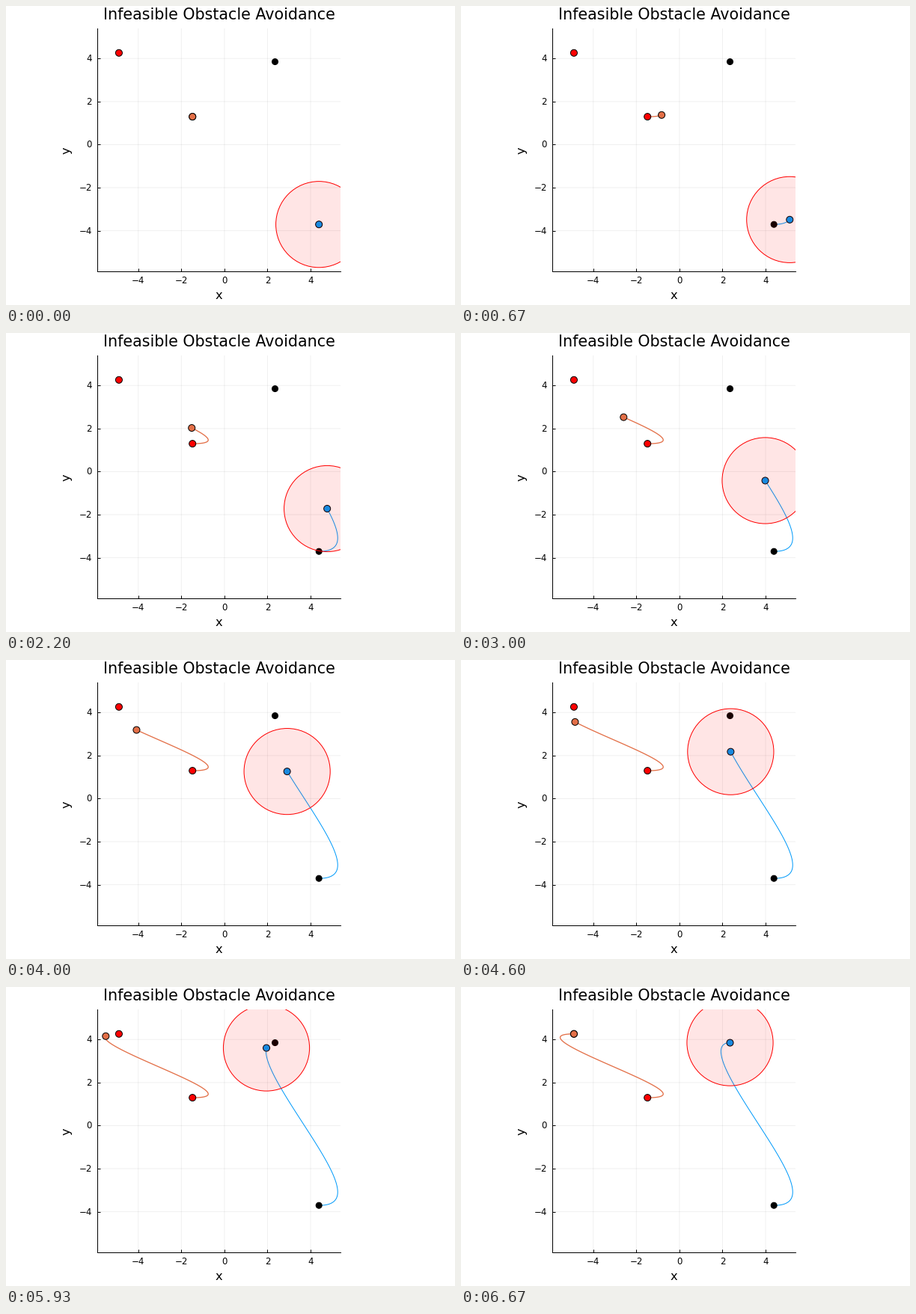
Recreate the animation shown at these times as a matplotlib script. Size 600 by 400 pixels, loop 6.74 s.

```python
import numpy as np
import matplotlib
import matplotlib.pyplot as plt
from matplotlib.animation import FuncAnimation
from matplotlib.patches import Circle

W, H, DPI = 600, 400, 100
PX = 72 / DPI                      # one pixel in points
LOOP, TICK = 6740, 20              # ms
STEPS, STEP = 100, 200 / 3         # moves per loop, ms per move
LEFT, RIGHT, TOP, BOTTOM = 122, 447.2, 29.9, 355
X0, Y0, UNIT = 291.9, 185.4, 28.79  # pixel place of (0, 0) and scale
TICKS = (-4, -2, 0, 2, 4)
RADIUS = 2
BLUE, ORANGE = "#009afa", "#e36f47"
FONT_SCALE = 1.0625

matplotlib.rcParams["font.family"] = "DejaVu Sans"


def glide(s, p, q, v, w, bend):
    """Move from p to q with end speeds v and w, plus a smooth bend."""
    ease = s * s * (3 - 2 * s)
    return (p + (q - p) * ease + v * s * (1 - s) ** 2
            - w * s * s * (1 - s) + bend * (s * (1 - s)) ** 2)


s = np.linspace(0, 1, STEPS + 1)
blue_path = np.array([glide(s, 4.386, 2.348, 11.02, 6.08, -5.89),
                      glide(s, -3.710, 3.850, 0, 0, 1.25)])
orange_path = np.array([glide(s, -1.483, -4.897, 10.32, 9.635, 0.2),
                        glide(s, 1.296, 4.260, 0, 0, -0.47)])

fig = plt.figure(figsize=(W / DPI, H / DPI), dpi=DPI, facecolor="white")
ax = fig.add_axes([LEFT / W, 1 - BOTTOM / H,
                   (RIGHT - LEFT) / W, (BOTTOM - TOP) / H])
ax.set_xlim((LEFT - X0) / UNIT, (RIGHT - X0) / UNIT)
ax.set_ylim((Y0 - BOTTOM) / UNIT, (Y0 - TOP) / UNIT)
ax.set_xticks(TICKS)
ax.set_yticks(TICKS)
ax.tick_params(direction="in", length=4 * PX, width=PX,
               labelbottom=False, labelleft=False)
ax.grid(color="black", alpha=0.06, linewidth=PX)
ax.set_axisbelow(True)
for line in ax.get_xgridlines() + ax.get_ygridlines():
    line.set_snap(False)
for side in ("top", "right"):
    ax.spines[side].set_visible(False)
for side in ("left", "bottom"):
    ax.spines[side].set_linewidth(PX)


def label(x, y, text, size, **kw):
    kw = {"ha": "center", "va": "baseline", **kw}
    fig.text(x / W, 1 - y / H, text, fontsize=size * FONT_SCALE, **kw)


def dot(point, color, z, radius=4.5):
    return ax.add_patch(Circle(point, radius / UNIT, facecolor=color,
                               edgecolor="black", linewidth=PX, zorder=z))


label(284.7, 18.2, "Infeasible Obstacle Avoidance", 14)
label(284.8, 391.9, "x", 11)
label(81.5, 193, "y", 11, va="center", rotation=90)
for t in TICKS:
    name = str(t).replace("-", "\u2212")
    label(X0 + t * UNIT, 371, name, 8)
    label(114.8, Y0 - t * UNIT + 4, name, 8, ha="right")

for path, color, radius in ((blue_path, "black", 4), (orange_path, "red", 4.5)):
    for end in (0, -1):
        dot(path[:, end], color, 4, radius)

movers = []
for path, color, width in ((blue_path, BLUE, 1), (orange_path, ORANGE, 1.3)):
    trail, = ax.plot([], [], color=color, linewidth=width * PX, zorder=3)
    movers.append((path, trail, dot(path[:, 0], color, 5)))

zone = ax.add_patch(Circle(blue_path[:, 0], RADIUS, facecolor=(1, 0, 0, 0.1),
                           edgecolor="red", linewidth=PX, zorder=6))


def draw(i):
    # the small lead keeps each move from falling one tick late
    n = min(STEPS, int((i * TICK + 0.75 * TICK) / STEP))
    for path, trail, head in movers:
        trail.set_data(*path[:, :n + 1])
        head.center = tuple(path[:, n])
    zone.center = tuple(blue_path[:, n])
    return [zone] + [a for m in movers for a in m[1:]]


anim = FuncAnimation(fig, draw, frames=LOOP // TICK, interval=TICK,
                     repeat=True, repeat_delay=0, blit=False)
plt.show()
```
